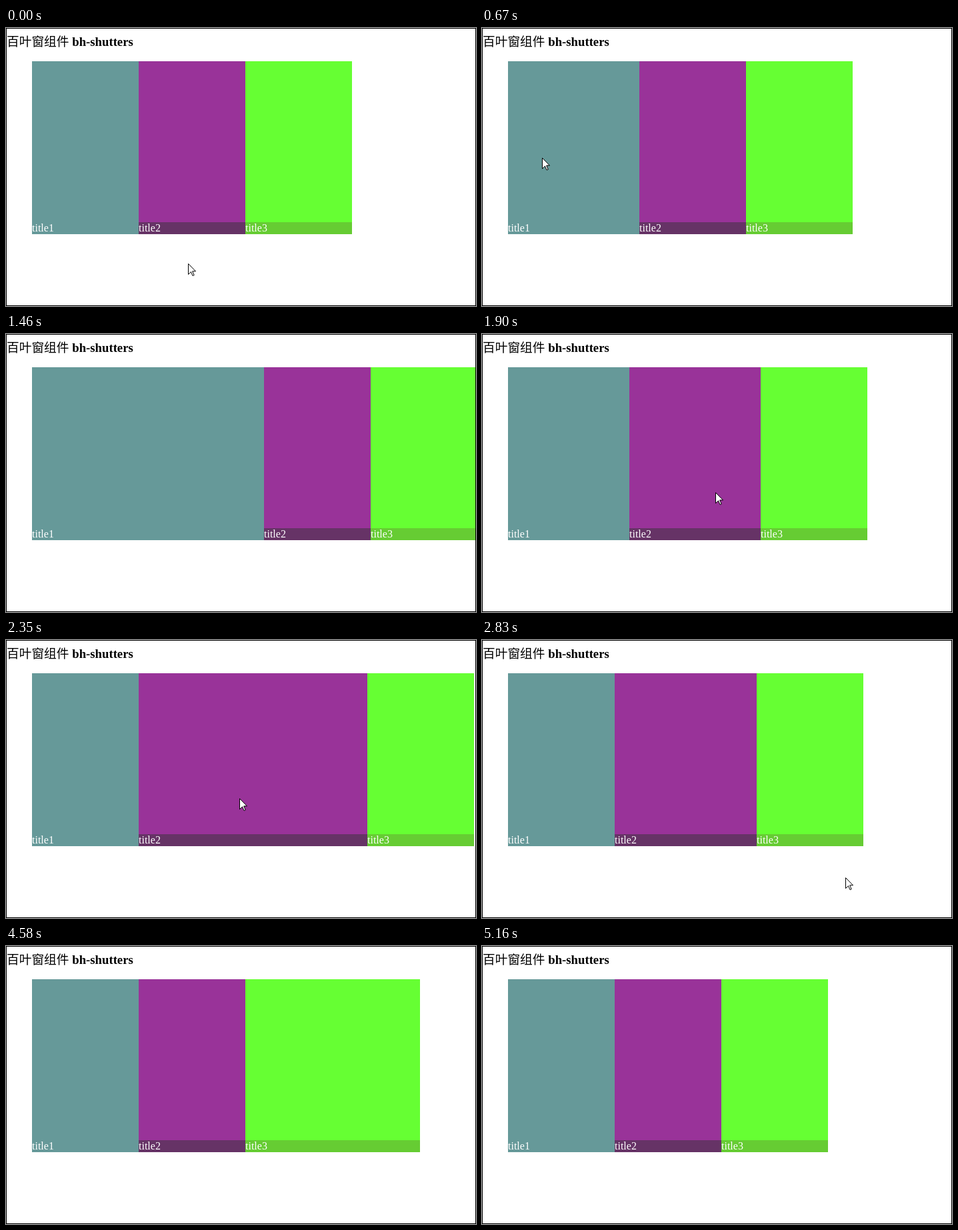
Recreate the animation shown at these times as an HTML page. Size 705 px wide and 418 px high, loop 5450 ms.

```html
<!DOCTYPE html>
<html lang="zh">
<head>
<meta charset="utf-8">
<title>bh-shutters</title>
<style>
  html, body { margin: 0; width: 100%; height: 100%; overflow: hidden; background: #fff; }
  svg { display: block; font: 16px "Liberation Serif", serif; }
  .heading { font-size: 18.72px; font-weight: 700; }
  .cjk { font-family: "Noto Sans CJK SC", "Noto Sans CJK", sans-serif; font-weight: 500; }
</style>
</head>
<body>
<svg width="705" height="418" viewBox="0 0 705 418">
  <rect width="705" height="418" fill="#fff"/>
  <text class="heading cjk" x="1" y="27">百叶窗组件</text>
  <text class="heading" x="99.3" y="27">bh-shutters</text>
  <g id="slides"></g>
  <rect x=".5" y=".5" width="704" height="417" fill="none" stroke="#000"/>
  <path id="cursor" fill="#fff" stroke="#000"
    d="M.5.5V16.5L4.5 12.7L7 18.5L9.2 17.6L6.7 11.8H11.5Z"/>
</svg>
<script>
const LOOP = 5450, LEFT = 39, TOP = 50, HEIGHT = 260, BAR = 18;
const BASE = 160, GROWTH = 200, DURATION = 845;

// Each slide opens at `on` and closes at `off`.
const slides = [
  { fill: '#669999', bar: '#669999', on: 583, off: 1427 },
  { fill: '#993399', bar: '#663366', on: 1813, off: 2489 },
  { fill: '#66ff33', bar: '#66cc33', on: 2912, off: 4376 }
];

// The picture refreshes in short bursts with pauses between them.
const burst = (start, firstGap, steps) => Array.from({ length: steps },
  (_, i) => i ? start + firstGap + 30 * (i - 1) : start);
const ticks = [
  0, 100, 500, 600, 640, 670, 710,
  ...burst(1000, 30, 6), ...burst(1460, 30, 6), ...burst(1900, 40, 5),
  ...burst(2320, 40, 5), ...burst(2740, 30, 5), ...burst(3170, 30, 6),
  ...burst(3610, 40, 6), ...burst(4060, 110, 6), ...burst(4580, 40, 5),
  ...burst(5000, 40, 6), LOOP
];

// time, x, y [, end time, end x, end y]; a lone time hides the pointer
const pointer = [
  [0, 273, 354], [100, 134, 269], [500, 90, 195], [1150],
  [1610, 350, 238], [2450],
  [2740, 590, 408, 2830, 545, 357], [2860, 492, 206],
  [3578, 492, 206, 3770, 574, 256],
  [4028, 574, 256, 4290, 680, 262], [4290]
];

const bezier = (a, b, s) => 3 * (1 - s) ** 2 * s * a + 3 * (1 - s) * s * s * b + s ** 3;

// CSS "ease"
function ease(t) {
  if (t <= 0) return 0;
  if (t >= 1) return 1;
  let lo = 0, hi = 1;
  for (let i = 0; i < 24; i++) {
    const mid = (lo + hi) / 2;
    if (bezier(.25, .25, mid) < t) lo = mid; else hi = mid;
  }
  return bezier(.1, 1, lo);
}

function add(parent, tag, attrs) {
  const el = document.createElementNS('http://www.w3.org/2000/svg', tag);
  for (const name in attrs) el.setAttribute(name, attrs[name]);
  return parent.appendChild(el);
}

const root = document.getElementById('slides');
const cursor = document.getElementById('cursor');
slides.forEach((slide, i) => {
  slide.group = add(root, 'g', {});
  slide.panel = add(slide.group, 'rect', { y: TOP, height: HEIGHT, fill: slide.fill });
  slide.strip = add(slide.group, 'rect',
    { y: TOP + HEIGHT - BAR, height: BAR, fill: slide.bar });
  add(slide.group, 'text', { y: 306, fill: '#fff' }).textContent = 'title' + (i + 1);
});

function drawSlides(time) {
  let x = LEFT;
  for (const { on, off, group, panel, strip } of slides) {
    const open = ease((time - on) / DURATION) * (1 - ease((time - off) / DURATION));
    const width = Math.round(BASE + GROWTH * open);
    group.setAttribute('transform', `translate(${x})`);
    panel.setAttribute('width', width);
    strip.setAttribute('width', width);
    x += width;
  }
}

function drawPointer(time) {
  const [start, x, y, end, endX, endY] = pointer.findLast(key => key[0] <= time);
  cursor.style.display = x === undefined ? 'none' : '';
  if (x === undefined) return;
  const k = end ? Math.min(1, (time - start) / (end - start)) : 0;
  const at = (from, to) => k ? Math.round(from + (to - from) * k) : from;
  cursor.setAttribute('transform', `translate(${at(x, endX)} ${at(y, endY)})`);
}

function draw() {
  const now = performance.now() % LOOP;
  const next = ticks.findIndex(t => t > now);
  // A refresh shows the slides as they stand when it ends.
  drawSlides(ticks[next]);
  drawPointer(ticks[next - 1]);
  requestAnimationFrame(draw);
}
draw();
</script>
</body>
</html>
```
